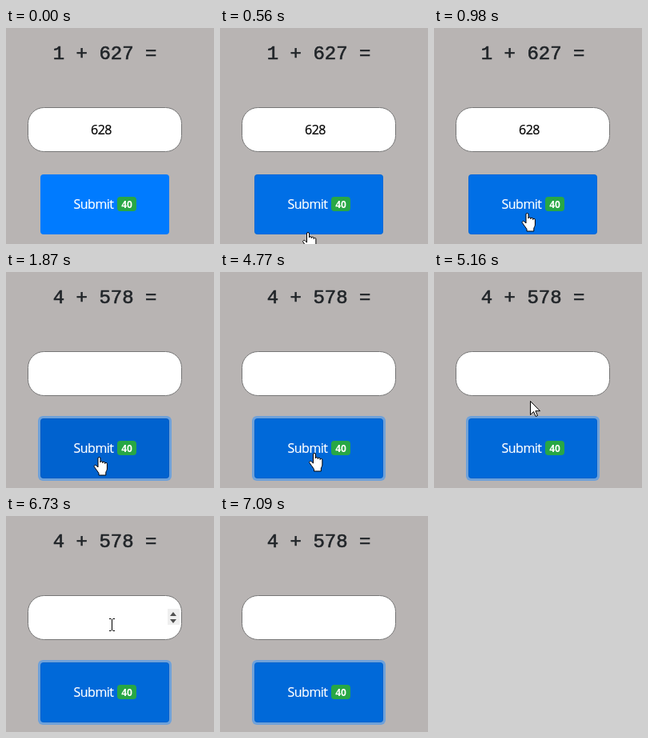
An HTML page that plays this animation: 260x270 px, repeating every 7.31 s.

```html
<!DOCTYPE html>
<html lang="en">
<head>
<meta charset="utf-8">
<title>Addition quiz</title>
<style>
  html, body { margin: 0; height: 100%; overflow: hidden; background: #b8b4b3; }
  svg { display: block; width: 100vw; height: 100vh; }
  text { font-family: "Open Sans", "Noto Sans", sans-serif; white-space: pre; }
  .label { font-size: 16px; letter-spacing: -.5px; stroke: currentColor; stroke-width: .2px; }
  #sum { font: 24px "Liberation Mono", monospace; fill: #212529; stroke: #212529; stroke-width: .6px; }
  .cursor { fill: #fff; stroke: #000; stroke-linejoin: round; }
</style>
</head>
<body>
<svg viewBox="0 0 260 270">
  <text id="sum" x="58.8" y="39"></text>

  <rect x="27.5" y="99.5" width="192" height="55" rx="20" fill="#fff" stroke="#767676"/>
  <text id="answer" class="label" x="106" y="133">628</text>
  <g id="spinner">
    <rect x="202" y="116" width="15" height="20" fill="#efefef"/>
    <path d="M205 125l4-5 4 5zM205 129l4 5 4-5z" fill="#505050"/>
  </g>

  <rect id="ring" x="40" y="180" width="167" height="81" rx="6" fill="#6fa1d9"/>
  <rect id="button" x="43" y="183" width="161" height="75" rx="4"/>
  <rect id="border" x="43.5" y="183.5" width="160" height="74" rx="3.5" fill="none" stroke="#000" stroke-opacity=".06"/>
  <text class="label" x="84.5" y="226" fill="#fff" color="#fff">Submit</text>
  <rect x="139" y="211" width="24" height="18" rx="4" fill="#28a745"/>
  <text x="151" y="225" font-size="12" font-weight="700" fill="#fff" text-anchor="middle">40</text>

  <path id="hand" class="cursor" d="M5.5 13V2a1.5 1.5 0 0 1 3 0V7a1.4 1.4 0 0 1 2.8 0v.6a1.4 1.4 0 0 1 2.8 0v1a1.4 1.4 0 0 1 2.8.3V15c0 2-1.6 3-1.6 5v3H6.5V20.5C5 18 2.5 15 1 12.8c-1.2-1.7.9-3.3 2.4-1.8z"/>
  <path id="arrow" class="cursor" d="M.5.5v17l4-4 2.7 6 2.3-1-2.6-5.8h5.6z"/>
  <path id="beam" class="cursor" style="fill:none" d="M-3-7.5h2.5m2 0h2.5M.5-7v14M-3 7.5h2.5m2 0h2.5"/>
</svg>
<script>
const LOOP = 7310;
const HOVER = 560, PRESS = 1600, NEXT = 1870, LEAVE = 4770;

// Sampled pointer: [start ms, shape, x, y]
const pointer = [
  [0, ''],
  [HOVER, 'hand', 103, 255],
  [680, 'hand', 103.5, 242],
  [830, 'hand', 108, 231],
  [980, 'hand', 109.5, 231],
  [LEAVE, 'hand', 111, 226],
  [4890, 'hand', 112, 204],
  [5010, 'hand', 113, 181],
  [5160, 'arrow', 120, 161],
  [5280, 'beam', 125, 146],
  [5400, 'beam', 126, 140],
  [5550, 'beam', 127, 135],
  [5670, 'beam', 128, 131],
  [6730, 'beam', 132, 136],
  [6850, 'hand', 160, 188],
  [6970, 'arrow', 216, 251],
  [7090, '']
];

const el = id => document.getElementById(id);
const show = (id, on) => el(id).setAttribute('visibility', on ? 'visible' : 'hidden');

function buttonColor(t) {
  if (t < HOVER) return '#007bff';
  if (t < PRESS) return '#006fe6';
  return t < LEAVE ? '#0062cf' : '#0069d9';
}

function draw(t) {
  const [, shape, x, y] = pointer.findLast(step => step[0] <= t);
  for (const id of ['hand', 'arrow', 'beam']) show(id, id === shape);
  if (shape) el(shape).setAttribute('transform', `translate(${x} ${y})`);
  el('sum').textContent = t < NEXT ? '1 + 627 =' : '4 + 578 =';
  el('button').setAttribute('fill', buttonColor(t));
  show('border', t >= HOVER);
  show('answer', t < NEXT);
  show('ring', t >= PRESS);
  show('spinner', shape === 'beam');
}

const start = performance.now();
function tick() {
  draw((performance.now() - start) % LOOP);
  requestAnimationFrame(tick);
}
tick();
</script>
</body>
</html>
```
